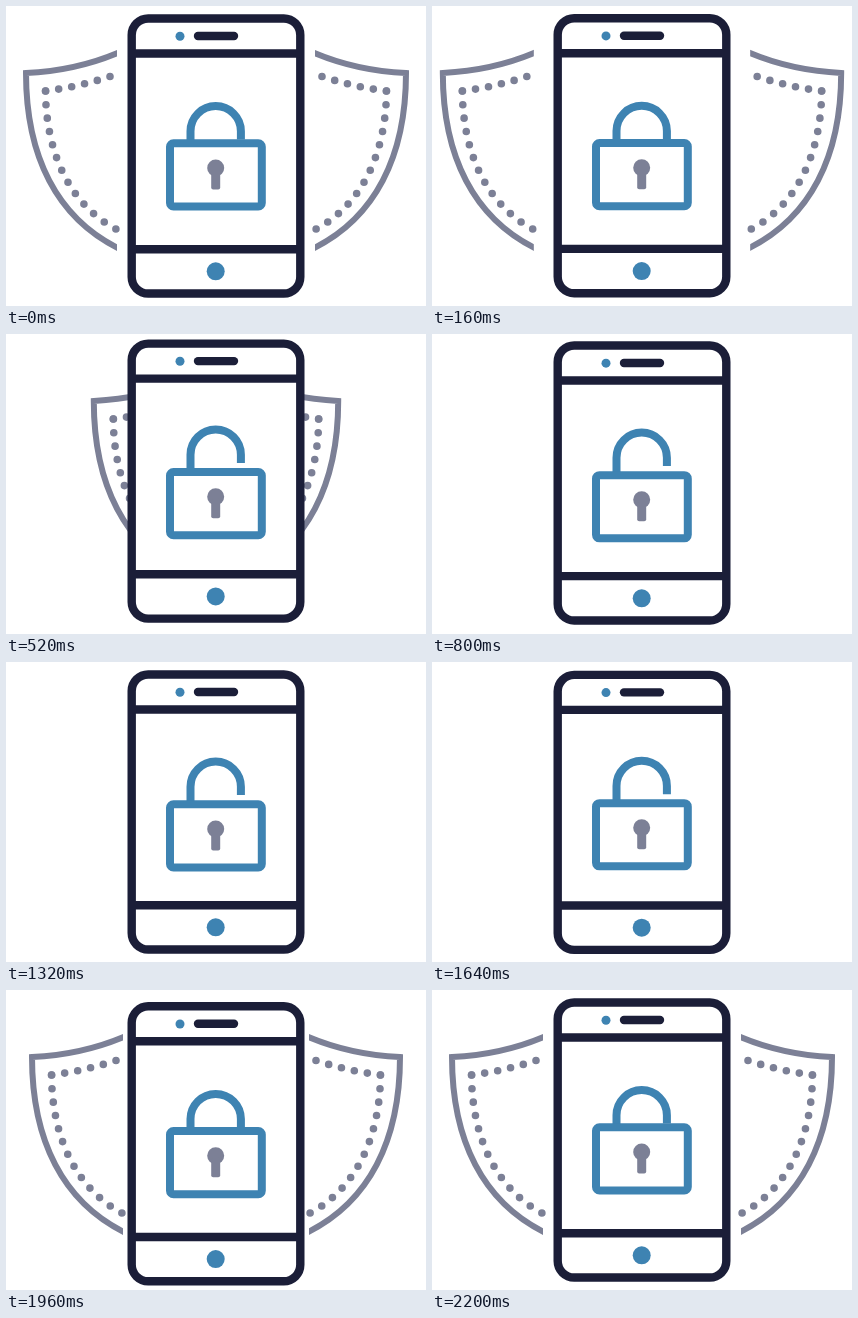
An HTML page for the animation above (3 s loop, 420x300 px).

```html
<!DOCTYPE html>
<html lang="en">
<head>
<meta charset="utf-8">
<title>Phone lock</title>
<style>
  html, body { margin: 0; width: 100%; height: 100%; overflow: hidden; background: #fff; }
  svg { display: block; width: 420px; height: 300px; }
  .navy { stroke: #1b1e38; stroke-width: 8.4; }
  .blue { stroke: #3e83b2; stroke-width: 8; }
  .grey { stroke: #7c8096; stroke-width: 6; }
  .grey .dots { stroke-width: 7.6; stroke-linecap: round; stroke-dasharray: 0 1; }
</style>
</head>
<body>
<svg viewBox="0 0 420 300" fill="none">
  <defs>
    <clipPath id="cut"><rect width="111" height="300"/></clipPath>
    <g id="shield" class="grey">
      <path clip-path="url(#cut)" d="M116 45Q72 64.5 20 67C20 149 50 213 116 244"/>
      <path class="dots" pathLength="5.01" d="M104 70.5Q72 81 39.5 85"/>
      <path class="dots" pathLength="12.01" d="M39.5 85C40 150 66 200 110 223"/>
    </g>
  </defs>
  <use id="left" href="#shield"/>
  <use id="right" href="#shield"/>
  <g id="phone">
    <rect class="navy" x="125.7" y="12.5" width="168.6" height="275" rx="16.5" fill="#fff"/>
    <path class="navy" d="M126 47.5H294M126 243.2H294"/>
    <path class="navy" stroke-linecap="round" d="M192 30H228"/>
    <circle cx="174" cy="30.2" r="4.5" fill="#3e83b2"/>
    <circle cx="209.7" cy="265.3" r="9" fill="#3e83b2"/>
  </g>
  <path id="shackle" class="blue" d="M184.5 142V125.3a25.2 25.2 0 0 1 50.4 0V133.6"/>
  <g id="body">
    <rect class="blue" x="164" y="137.3" width="91.8" height="63.2" rx="3.5" fill="#fff"/>
    <circle cx="209.7" cy="162" r="8.5" fill="#7c8096"/>
    <rect x="205.2" y="164" width="9" height="19.5" rx="2" fill="#7c8096"/>
  </g>
</svg>
<script>
const LOOP = 3000, STEP = 40;
const TRAVEL = 139; // how far each shield slides to hide behind the phone

const ramp = (t, from, to) => Math.min(1, Math.max(0, (t - from) / (to - from)));
const smooth = (t, from, to) => (1 - Math.cos(Math.PI * ramp(t, from, to))) / 2;
const backIn = (u, s) => u * u * ((s + 1) * u - s);

// Accelerates up to 1 at the peak, then eases back to 0
const pulse = (t, from, peak, to) =>
  t < peak ? ramp(t, from, peak) ** 2 : 1 - smooth(t, peak, to);

function move(id, x, y, extra = "") {
  document.getElementById(id).setAttribute("transform", `translate(${x} ${y}) ${extra}`);
}

function draw(now) {
  const t = Math.floor(now % LOOP / STEP) * STEP;
  const slide = TRAVEL * (t < 1200
    ? backIn(ramp(t, 0, 600), 1.63)
    : backIn(1 - ramp(t, 1800, 2200), 1.2));
  const bob = 3.8 * pulse(t, 1500, 1950, 2200) - 2.9 * pulse(t, 0, 510, 1000);
  const open = smooth(t, 400, 520) - smooth(t, 1600, 1900);
  const hop = 1.2 * pulse(t, 400, 520, 700) + 5.5 * pulse(t, 1500, 1800, 1900);
  const lockY = bob - hop - open / 2;

  move("left", slide, 0);
  move("right", 420 - slide, 0, "scale(-1 1)");
  move("phone", 0, bob);
  move("shackle", 0, lockY);
  move("body", 0, lockY + 5.4 * open);
}

const start = performance.now();
function tick() {
  draw(performance.now() - start);
  requestAnimationFrame(tick);
}
tick();
</script>
</body>
</html>
```
